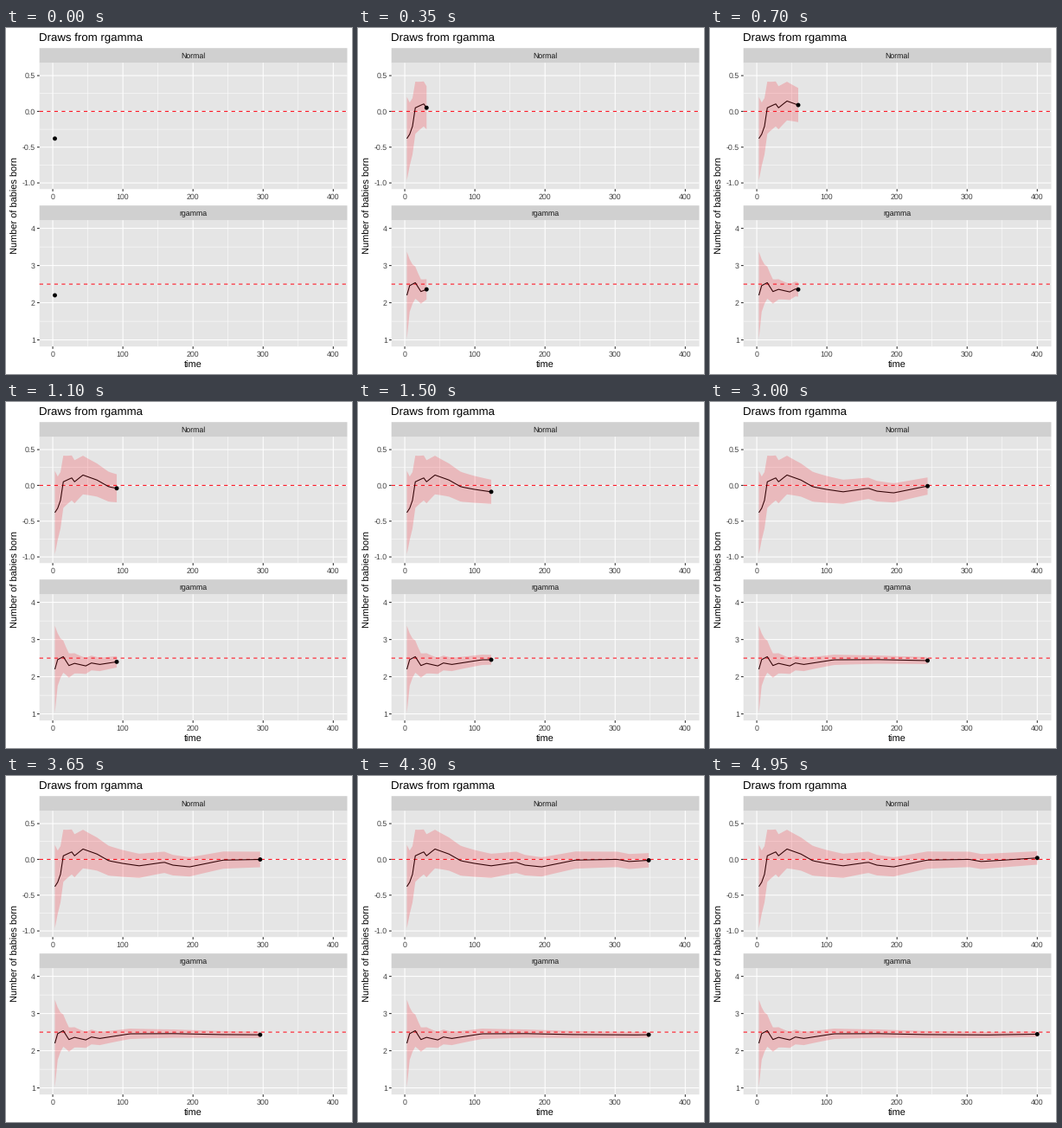
These frames come from a looping animation (400x400 px, 5 s). A matplotlib script:

```python
import numpy as np
import matplotlib
import matplotlib.pyplot as plt
from matplotlib.animation import FuncAnimation
from matplotlib.patches import Circle, Polygon, Rectangle

matplotlib.rcParams["font.family"] = "Liberation Sans"
matplotlib.rcParams["text.hinting"] = "none"

SIZE, FRAMES, STEP_MS = 400, 100, 50
PX = 0.72  # points per pixel at 100 dpi
LEFT, RIGHT = 38.7, 394.5
MID = (LEFT + RIGHT) / 2
THICK, THIN = 1.067, 0.533
RED = "#fb0d1b"
TIME = np.linspace(3, 400, FRAMES)

# Turning points (time, value) of the two running means.
NORMAL_TURNS = [(3, -.38), (7, -.32), (11, -.21), (15, .05), (27, .105),
                (31, .05), (43, .145), (63, .075), (80, -.02), (99, -.055),
                (123, -.09), (159, -.04), (171, -.08), (195, -.105),
                (243, -.01), (303, 0), (320, -.03), (400, .02)]
GAMMA_TURNS = [(3, 2.2), (7, 2.46), (15, 2.54), (23, 2.3), (31, 2.36),
               (47, 2.29), (55, 2.37), (67, 2.33), (110, 2.455),
               (173, 2.46), (240, 2.435), (330, 2.425), (400, 2.445)]

fig = plt.figure(figsize=(4, 4), dpi=100, facecolor="white")
ax = fig.add_axes([0, 0, 1, 1])
ax.set_xlim(0, SIZE)
ax.set_ylim(SIZE, 0)
ax.axis("off")


def x_pos(t):
    return 54.06 + 0.8107 * t


def spread(final, extra, decay):
    """Band half width: a settling deviation over the root of the sample size."""
    return (final + extra * np.exp(-TIME / decay)) / np.sqrt(TIME)


def segment(xs, ys, color, width, **kw):
    ax.plot(xs, ys, color=color, lw=width * PX, solid_capstyle="butt",
            dash_capstyle="butt", snap=False, **kw)


def label(x, y, text, size, color="black", ha="center", **kw):
    ax.text(x, y, text, fontsize=size * PX, color=color, ha=ha, va="baseline", **kw)


def box(top, bottom, color):
    ax.add_patch(Rectangle((LEFT, top), RIGHT - LEFT, bottom - top,
                           fc=color, lw=0, snap=False))


class Panel:
    def __init__(self, name, strip_top, zero, scale, ticks, digits,
                 target, turns, half):
        self.zero, self.scale = zero, scale
        self.top, self.bottom = strip_top + 17, strip_top + 163
        box(self.top, self.bottom, "#e5e5e5")
        self.draw_grid(ticks, digits)
        box(strip_top, self.top, "#d0d0d0")
        label(MID, strip_top + 11.8, name, 8.8, "#151515")
        segment([LEFT, RIGHT], [self.y_pos(target)] * 2, RED, THICK,
                linestyle=(0, (4, 4)))

        mean = np.interp(TIME, *zip(*turns))
        self.x, self.y = x_pos(TIME), self.y_pos(mean)
        self.high, self.low = self.y_pos(mean + half), self.y_pos(mean - half)
        self.line, = ax.plot([], [], color="black", lw=THICK * PX,
                             solid_capstyle="butt", zorder=3)
        self.band = ax.add_patch(Polygon(np.zeros((3, 2)), fc=RED, alpha=0.2,
                                         lw=0, zorder=4))
        self.dot = ax.add_patch(Circle((0, 0), 2.45, fc="black", lw=0, zorder=5))

    def y_pos(self, v):
        return self.zero - self.scale * v

    def draw_grid(self, ticks, digits):
        for t in range(50, 400, 100):
            segment([x_pos(t)] * 2, [self.top, self.bottom], "white", THIN)
        for a, b in zip(ticks, ticks[1:]):
            segment([LEFT, RIGHT], [self.y_pos((a + b) / 2)] * 2, "white", THIN)
        for t in range(0, 401, 100):
            x = x_pos(t)
            segment([x, x], [self.top, self.bottom], "white", THICK)
            segment([x, x], [self.bottom, self.bottom + 2.7], "#2a2a2a", THICK)
            label(x, self.bottom + 12, str(t), 8.8, "#404040")
        for v in ticks:
            y = self.y_pos(v)
            segment([LEFT, RIGHT], [y, y], "white", THICK)
            segment([LEFT - 2.7, LEFT], [y, y], "#2a2a2a", THICK)
            label(LEFT - 4.9, y + 3.1, f"{v:.{digits}f}", 8.8, "#404040", ha="right")

    def reveal(self, i):
        n = i + 1
        x, high, low = self.x[:n], self.high[:n], self.low[:n]
        self.line.set_data(x, self.y[:n])
        self.dot.center = self.x[i], self.y[i]
        self.band.set_xy(np.column_stack([np.r_[x, x[::-1]],
                                          np.r_[high, low[::-1]]]))
        return self.band, self.line, self.dot


panels = [
    Panel("Normal", 23.2, 96.4, 82.7, (-1, -0.5, 0, 0.5), 1,
          0, NORMAL_TURNS, spread(1.88, -1.02, 19)),
    Panel("rgamma", 205.2, 403.6, 43.0, (1, 2, 3, 4), 0,
          2.5, GAMMA_TURNS, spread(1.47, 0.72, 12)),
]
label(38.2, 15, "Draws from rgamma", 13.2, ha="left")
label(MID, 393, "time", 11)
label(14, 204.5, "Number of babies born", 11, rotation=90, rotation_mode="anchor")


def update(i):
    return [artist for panel in panels for artist in panel.reveal(i)]


anim = FuncAnimation(fig, update, frames=FRAMES, interval=STEP_MS,
                     repeat=True, repeat_delay=0)
plt.show()
```
